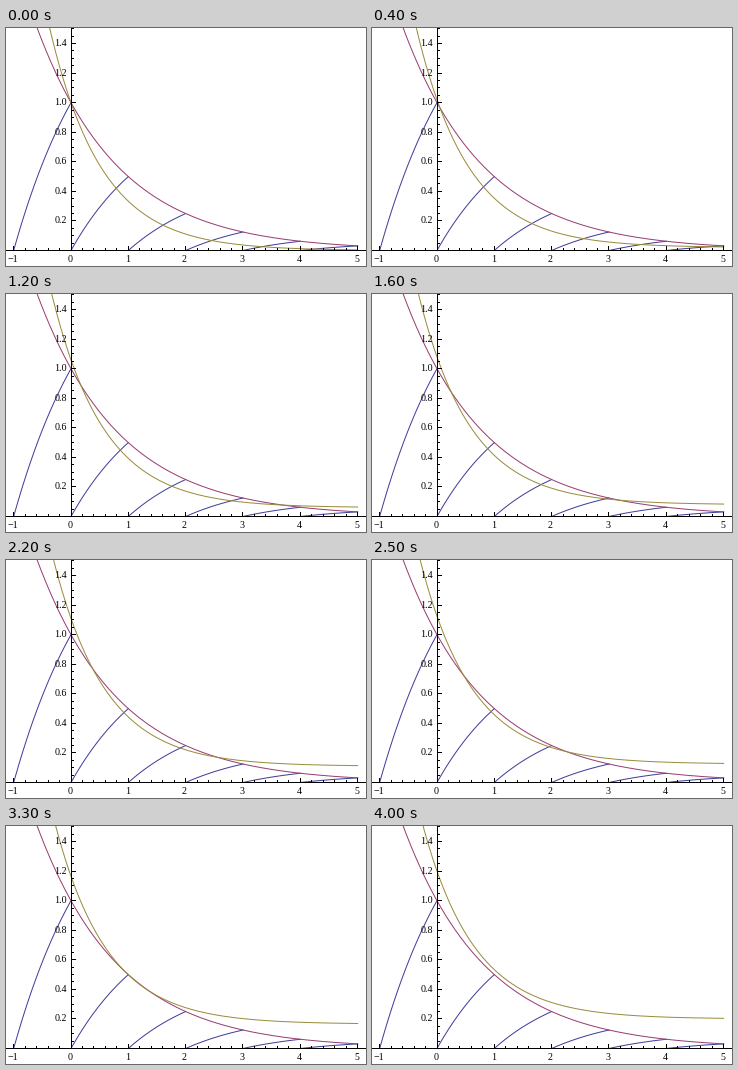
A matplotlib script for the animation above (4100 ms loop, 360x238 px).

```python
import numpy as np
import matplotlib.pyplot as plt
from matplotlib.animation import FuncAnimation

W, H, DPI = 360, 238, 100
PX = 72 / DPI  # points per pixel
X0, Y0 = 65.0, 222.5
X_UNIT, Y_UNIT = 57.33, 147.8
FRAMES, INTERVAL = 41, 100
LIFT = 0.005  # rise of the upper curve per frame
MAJOR, MINOR = 4.5, 2.5  # tick lengths

BLUE, PURPLE, OLIVE = "#3f3d99", "#993d71", "#998c3d"

fig = plt.figure(figsize=(W / DPI, H / DPI), dpi=DPI, facecolor="white")
ax = fig.add_axes([0, 0, 1, 1])
ax.set_xlim(0, W)
ax.set_ylim(H, 0)
ax.axis("off")


def to_px(x, y):
    return X0 + X_UNIT * np.asarray(x), Y0 - Y_UNIT * np.asarray(y)


def curve(x, y, color):
    return ax.plot(*to_px(x, y), color=color, lw=PX, zorder=2)[0]


def rule(xs, ys):
    ax.plot(xs, ys, color="black", lw=PX, zorder=3, snap=False,
            solid_capstyle="butt")


def label(x, y, text, align):
    ax.text(x, y, text, ha=align, va="baseline", family="Liberation Serif",
            fontsize=10 * PX, color="black", zorder=4)


def pixel_center(v):
    return np.floor(v) + 0.5


def draw_axes():
    left, base = pixel_center(X0), pixel_center(Y0)
    rule([0, W], [base, base])
    rule([left, left], [0, base + 0.5])
    for i in range(-5, 26):
        x = pixel_center(X0 + X_UNIT * i / 5)
        major = i % 5 == 0
        rule([x, x], [base, base - (MAJOR if major else MINOR)])
        if major:
            label(x - 1, 234.5, str(i // 5).replace("-", "\u2212"), "center")
    for i in range(1, 31):
        y = pixel_center(Y0 - Y_UNIT * i / 20)
        major = i % 4 == 0
        rule([left, left + (MAJOR if major else MINOR)], [y, y])
        if major:
            label(61, y + 2.5, f"{i / 20:.1f}", "right")


# Sawtooth arcs 2^-floor(x) - 2^-x, one per unit interval
for n in range(-1, 5):
    t = np.linspace(n, n + 1, 60)
    curve(t, 2.0 ** -n - 2.0 ** -t, BLUE)

x = np.linspace(-1, 5, 500)
curve(x, 2.0 ** -x, PURPLE)
upper = curve(x, 3.0 ** -x, OLIVE)
draw_axes()


def update(i):
    upper.set_data(*to_px(x, 3.0 ** -x + LIFT * i))
    return (upper,)


anim = FuncAnimation(fig, update, frames=FRAMES, interval=INTERVAL,
                     repeat=True, repeat_delay=0)
plt.show()
```
